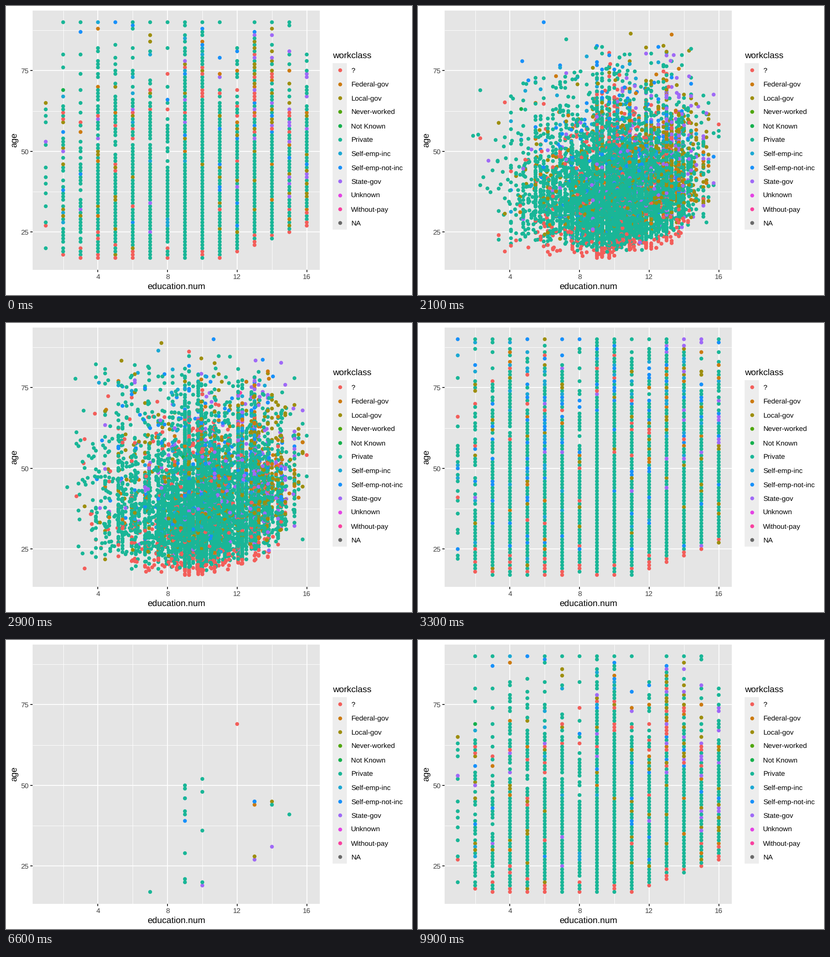
Write a matplotlib script that moves like this. It is 885 px wide and 632 px high and loops after 10 s.

```python
import matplotlib.pyplot as plt
import numpy as np
from matplotlib.animation import FuncAnimation
from matplotlib.colors import to_rgba_array
from matplotlib.patches import Rectangle

W, H, DPI = 885, 632, 128
PT = 72 / DPI  # points per pixel
LEFT, RIGHT, TOP, BOTTOM = 58.2, 684, 9.7, 576.7
DOT = (8.4 * PT) ** 2

plt.rcParams["font.family"] = "Liberation Sans"
plt.rcParams["text.hinting"] = "none"

COLORS = {
    "?": "#F35E5A", "Federal-gov": "#CC7A10", "Local-gov": "#9D8E0E",
    "Never-worked": "#4FA60E", "Not Known": "#14B04C", "Private": "#19B697",
    "Self-emp-inc": "#1BA8D3", "Self-emp-not-inc": "#1790FA",
    "State-gov": "#9F69F7", "Unknown": "#E442E4", "Without-pay": "#F9409F",
    "NA": "#696969",
}
NONE, FED, LOCAL, _, _, PRIVATE, INC, SELF, STATE, _, _, _ = COLORS
rng = np.random.default_rng(11)


def px(x):
    return LEFT + (x - 0.25) * (RIGHT - LEFT) / 16.5


def py(age):
    return BOTTOM - (age - 13.35) * (BOTTOM - TOP) / 80.3


# ---- the people -------------------------------------------------------

COLUMNS = np.arange(1, 17)
SHARE = np.array([.16, .5, 1, 2, 1.6, 2.9, 3.6, 1.3, 32, 22.4,
                  4.3, 3.3, 16.5, 5.3, 1.8, 1.3])
# rows that appear in both crowds, and rows only the second crowd has
SHARED = dict(zip(COLORS, (839, 315, 835, 2, 1, 7752, 135, 399, 489, 1, 5, 6)))
EXTRA = {NONE: 160, FED: 330, LOCAL: 420, PRIVATE: 7200, INC: 850,
         SELF: 1740, STATE: 320}


def rows(counts):
    """Class names in random order, common ones slightly later (on top)."""
    names = np.repeat(list(counts), list(counts.values()))
    return names[np.argsort(rng.random(len(names)) + .03 * (names == PRIVATE))]


def pick_columns(n, weight):
    return rng.choice(COLUMNS, n, p=weight / weight.sum())


def people(names, spread):
    """Column and age for each row, by the habits of its class."""
    n = len(names)
    public = np.isin(names, [FED, LOCAL, STATE])
    own = np.isin(names, [SELF, INC])
    x = np.where(public, pick_columns(n, SHARE * np.where(COLUMNS > 12, 3.5, 1)),
                 pick_columns(n, SHARE))
    youngest = 17 + np.maximum(0, 2 * (x - 11))
    shape = np.select([public, own], [2.8, 3.2], 2.3)
    stretch = 1 + .1 * np.maximum(0, 7 - x)
    age = youngest + rng.gamma(shape, spread * stretch)
    # no class given: mostly students and retired people
    luck = np.where(names == NONE, rng.random(n), 1)
    age = np.where(luck < .75, rng.normal(62, 8, n), age)
    age = np.where(luck < .5, youngest + rng.exponential(4, n), age)
    return np.column_stack([x, np.clip(np.floor(age), youngest, 90)])


def rgba(names):
    return to_rgba_array([COLORS[n] for n in names])


def still(spots, names):
    """One dot per place, in the colour of the last row there."""
    top = dict(zip(map(tuple, spots), names))
    return np.array(list(top)), rgba(top.values())


# class: column and age in the third state, then in the first
FEW = [
    (SELF, 9, 46, 15, 45), (SELF, 13, 45, 14, 56), (SELF, 9, 39, 9, 31),
    (FED, 13, 44, 9, 68), (STATE, 13, 27, 13, 60), (STATE, 14, 31, 16, 49),
    (STATE, 10, 19, 16, 74), (LOCAL, 14, 45, 9, 59), (LOCAL, 13, 28, 14, 55),
    (NONE, 12, 69, 9, 90), (SELF, 13, 45, 16, 37), (PRIVATE, 9, 42, 4, 54),
    (PRIVATE, 14, 44, 13, 48), (PRIVATE, 7, 17, 7, 29),
    (PRIVATE, 10, 48, 9, 82), (PRIVATE, 10, 36, 9, 34),
    (PRIVATE, 10, 20, 14, 54), (PRIVATE, 10, 52, 15, 51),
    (PRIVATE, 9, 49, 9, 50), (PRIVATE, 9, 46, 10, 41),
    (PRIVATE, 9, 29, 10, 36), (PRIVATE, 9, 21, 16, 45),
    (PRIVATE, 9, 50, 14, 28), (PRIVATE, 9, 41, 14, 58),
    (PRIVATE, 9, 20, 9, 76), (PRIVATE, 15, 41, 13, 52),
]
few_names = np.array([f[0] for f in FEW])
few_rgba = rgba(few_names)
few_here = np.array([f[1:3] for f in FEW], float)
few_next = np.array([f[3:] for f in FEW], float)
few_before = people(few_names, 9)

names = rows(SHARED)
crowd_from, crowd_to = people(names, 8.3), people(names, 9)
crowd_rgba = rgba(names)
extra = rows(EXTRA)
all_names = np.concatenate([names, extra])
mix = np.argsort(rng.random(len(all_names)) + .03 * (all_names == PRIVATE))
all_names = all_names[mix]
all_spots = np.vstack([crowd_to, people(extra, 9)])[mix]

first = still(np.vstack([few_next, crowd_from]),
              np.concatenate([few_names, names]))
second = still(np.vstack([few_before, all_spots]),
               np.concatenate([few_names, all_names]))
waiting = still(all_spots, all_names)


def blend(a, b, t):
    return a + (b - a) * t


def dots_at(i):
    if i < 17 or i == 99:
        return first
    if i < 33:
        return blend(crowd_from, crowd_to, (i - 16) / 17), crowd_rgba
    if i < 50:
        return second
    if i < 66:
        # the few leave, all others wait until they arrive
        moving = blend(few_before, few_here, (i - 49) / 17)
        return (np.vstack([moving, waiting[0]]),
                np.vstack([few_rgba, waiting[1]]))
    return blend(few_here, few_next, max(0, i - 83) / 16), few_rgba


# ---- stage ------------------------------------------------------------

fig = plt.figure(figsize=(W / DPI, H / DPI), dpi=DPI, facecolor="white")
ax = fig.add_axes([0, 0, 1, 1])
ax.set(xlim=(0, W), ylim=(H, 0))
ax.axis("off")


def box(x0, y0, x1, y1, color):
    ax.add_patch(Rectangle((x0, y0), x1 - x0, y1 - y0, fc=color, lw=0))


def line(xs, ys, width, color="white"):
    ax.plot(xs, ys, color=color, lw=width * PT, solid_capstyle="butt")


def label(x, y, s, size=15.4, color="black", **kw):
    ax.text(x, y, s, fontsize=size * PT, color=color, va="baseline", **kw)


box(LEFT, TOP, RIGHT, BOTTOM, "#E5E5E5")
for x in range(2, 15, 4):
    line([px(x)] * 2, [TOP, BOTTOM], .95)
for a in (37.5, 62.5, 87.5):
    line([LEFT, RIGHT], [py(a)] * 2, .95)
for x in range(4, 17, 4):
    line([px(x)] * 2, [TOP, BOTTOM], 1.87)
    line([px(x)] * 2, [BOTTOM, BOTTOM + 4.8], 1.87, "#242424")
    label(px(x), 596.9, str(x), color="#3C3C3C", ha="center")
for a in (25, 50, 75):
    line([LEFT, RIGHT], [py(a)] * 2, 1.87)
    line([LEFT - 4.8, LEFT], [py(a)] * 2, 1.87, "#242424")
    label(49.3, py(a) + 5.5, str(a), color="#3C3C3C", ha="right")

label((LEFT + RIGHT) / 2, 618.6, "education.num", 19.25, ha="center")
label(23.4, (TOP + BOTTOM) / 2, "age", 19.25, ha="center", rotation=90,
      rotation_mode="anchor")
label(711.7, 113.6, "workclass", 19.25)

KEY = 30.35
box(712.3, 125.2, 712.3 + KEY, 125.2 + 12 * KEY, "#EDEDED")
for i, (name, color) in enumerate(COLORS.items()):
    y = 125.2 + (i + .5) * KEY
    ax.scatter([727.5], [y], s=DOT, c=color, linewidths=0)
    label(752.3, y + 5.6, name)

dots = ax.scatter([], [], s=DOT, linewidths=0, zorder=3)


def draw(i):
    spots, colors = dots_at(i)
    dots.set_offsets(np.column_stack([px(spots[:, 0]), py(spots[:, 1])]))
    dots.set_facecolors(colors)
    return [dots]


anim = FuncAnimation(fig, draw, frames=100, interval=100, repeat=True,
                     repeat_delay=0, blit=False)
plt.show()
```
